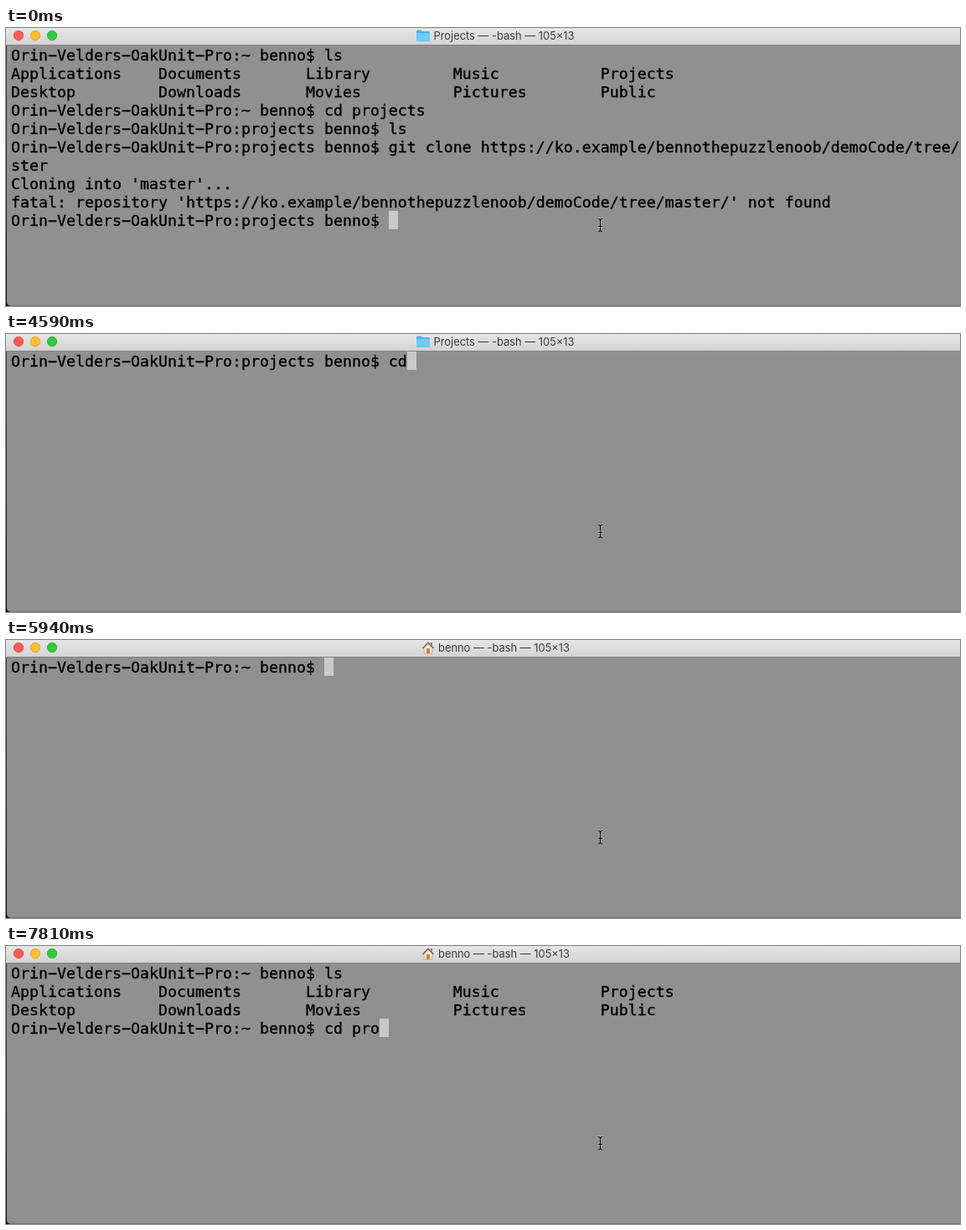
An HTML page for the animation above (8000 ms loop, 1139x333 px).

```html
<!DOCTYPE html>
<html lang="en">
<head>
<meta charset="utf-8">
<title>Terminal</title>
<style>
  html, body { margin: 0; width: 100%; height: 100%; overflow: hidden; background: #20232b; }
  svg { display: block; width: 100%; height: 100%; }
  #rows text { font: 18.27px "DejaVu Sans Mono", monospace; white-space: pre; stroke: #000; stroke-width: .35px; }
  #title { font: 12.9px Inter, Roboto, sans-serif; fill: #3c3c3c; text-anchor: middle; }
</style>
</head>
<body>
<svg viewBox="0 0 1139 333">
  <defs>
    <linearGradient id="bar" x2="0" y2="1">
      <stop offset="0" stop-color="#e6e6e6"/>
      <stop offset="1" stop-color="#d3d3d3"/>
    </linearGradient>
    <linearGradient id="desk" x2="0" y2="1">
      <stop offset="0" stop-color="#3a3f4d"/>
      <stop offset=".4" stop-color="#50332f"/>
      <stop offset=".7" stop-color="#1d2840"/>
      <stop offset="1" stop-color="#12151c"/>
    </linearGradient>
    <path id="beam" d="M707 228.5q2.5 0 2.500 2.500v10.500q0 2.500-2.500 2.500M712 228.500q-2.500 0-2.500 2.500v10.500q0 2.500 2.500 2.500M707.500 237.500h4"/>
  </defs>
  <rect width="1139" height="333" fill="url(#desk)"/>
  <path d="M1 0H1139V332.7H6Q1 332.7 1 327.7Z" fill="#909090"/>
  <rect width="1139" height="20" fill="url(#bar)"/>
  <rect y="20" width="1139" height="1" fill="#828282"/>
  <g stroke-width=".8">
    <circle cx="15" cy="9" r="5.7" fill="#fc5b57" stroke="#e2443f"/>
    <circle cx="35" cy="9" r="5.7" fill="#fdbd30" stroke="#dfa023"/>
    <circle cx="55" cy="9" r="5.7" fill="#34c83f" stroke="#24aa2f"/>
  </g>
  <g id="folder">
    <path d="M490 4q0-1.5 1.5-1.5h4l1.5 1.5h7.5q1.5 0 1.5 1.5v10h-16z" fill="#4fafdf"/>
    <path d="M490 6h16v9q0 1-1 1h-14q-1 0-1-1z" fill="#70cbf6"/>
  </g>
  <g id="house">
    <path d="M499 9l5-5 5 5v7h-10z" fill="#eee7dc" stroke="#a99b89" stroke-width=".7"/>
    <path d="M497.5 10l6.5-6.5 6.5 6.5" fill="none" stroke="#786a5c" stroke-width="1.7"/>
    <path d="M507 3h2v4l-2-2z" fill="#9b7459"/>
    <rect x="502" y="10" width="4" height="6" fill="#d9822f"/>
  </g>
  <text id="title" x="594.5" y="14"></text>
  <rect id="cursor" width="11" height="22" fill="#c9c9c9"/>
  <g id="rows"></g>
  <g fill="none" stroke-linecap="round">
    <use href="#beam" stroke="#b4b4b4" stroke-width="2.4"/>
    <use href="#beam" stroke="#111" stroke-width="1.2"/>
  </g>
</svg>
<script>
const DURATION = 8000, CELL = 11, LINE = 22, LEFT = 6, TOP = 21;
const $ = id => document.getElementById(id);

// The wide minus sign stands in for the terminal font's long hyphen.
const prompt = dir => `Orin−Velders−OakUnit−Pro:${dir} benno$ `;
const home = prompt('~'), work = prompt('projects');
const columns = (...names) => names.map(name => name.padEnd(16)).join('').trimEnd();
const repo = 'https://ko.example/bennothepuzzlenoob/demoCode/tree/master';

const listing = [
  home + 'ls',
  columns('Applications', 'Documents', 'Library', 'Music', 'Projects'),
  columns('Desktop', 'Downloads', 'Movies', 'Pictures', 'Public')
];
const clone = work + 'git clone ' + repo;
const history = [
  ...listing,
  home + 'cd projects',
  work + 'ls',
  clone.slice(0, 105),
  clone.slice(105),
  "Cloning into 'master'...",
  `fatal: repository '${repo}/' not found`
];

// Each step: start time, finished lines, current prompt, typed input.
const steps = [
  [0, history, work, ''],
  [270, history, work, 'cl'],
  [540, history, work, 'clear'],
  [810, [], work, ''],
  [4590, [], work, 'cd'],
  [4860, [work + 'cd'], home, ''],
  [5400, [work + 'cd'], home, 'cle'],
  [5670, [work + 'cd'], home, 'clear'],
  [5940, [], home, ''],
  [6470, listing, home, ''],
  [7280, listing, home, 'cd'],
  [7550, listing, home, 'cd p'],
  [7810, listing, home, 'cd pro']
];

function add(tag, attributes, content = '') {
  const node = document.createElementNS('http://www.w3.org/2000/svg', tag);
  for (const key in attributes) node.setAttribute(key, attributes[key]);
  node.textContent = content;
  $('rows').append(node);
}

function draw([, lines, current, input]) {
  const atHome = current === home;
  $('title').textContent = `${atHome ? 'benno' : 'Projects'} — -bash — 105×13`;
  $('house').style.display = atHome ? '' : 'none';
  $('folder').style.display = atHome ? 'none' : '';
  $('rows').replaceChildren();
  [...lines, current + input].forEach((line, row) => {
    const y = TOP + row * LINE;
    const submitted = row < lines.length && (line.startsWith(home) || line.startsWith(work));
    if (submitted) add('rect', { x: 3, y: y + 1, width: 1, height: 20, fill: '#9e9e9e' });
    add('text', { x: LEFT, y: y + 18 }, line);
  });
  $('cursor').setAttribute('x', LEFT + (current + input).length * CELL);
  $('cursor').setAttribute('y', TOP + lines.length * LINE);
}

let shown;
function tick() {
  const time = performance.now() % DURATION;
  const step = steps.findLast(([start]) => start <= time);
  if (step !== shown) draw(shown = step);
  requestAnimationFrame(tick);
}
tick();
</script>
</body>
</html>
```
